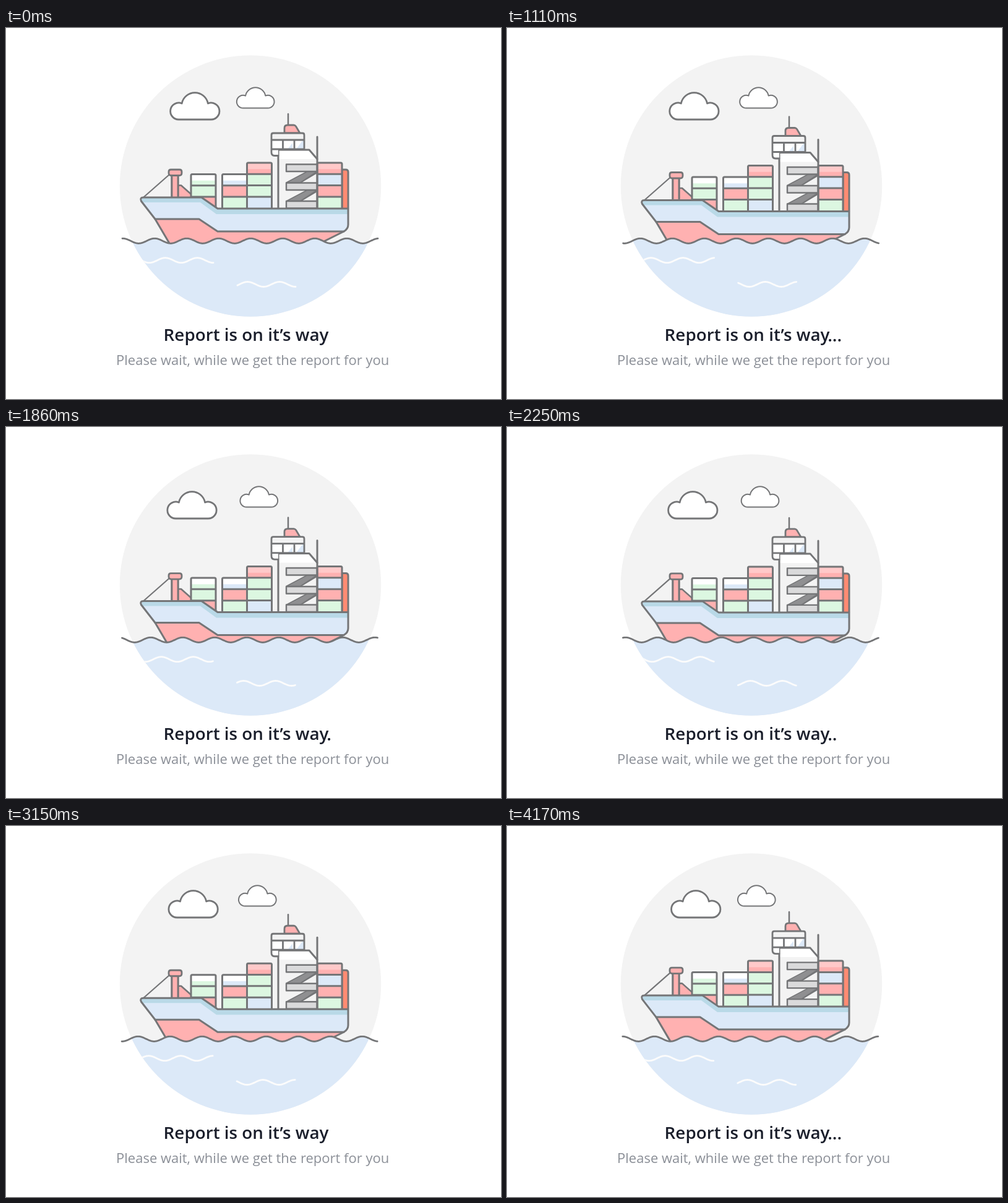
Write an HTML page with a canvas that moves like this. It is 800 by 600 pixels and loops after 4.2 s.

```html
<!DOCTYPE html>
<html lang="en">
<head>
<meta charset="utf-8">
<title>Report loading</title>
<style>
  html, body { margin: 0; width: 100%; height: 100%; overflow: hidden; background: #fff; }
  canvas { display: block; }
</style>
</head>
<body>
<canvas id="stage" width="800" height="600"></canvas>
<script>
const ctx = document.getElementById('stage').getContext('2d');
const LOOP = 4200, DOTS = 1400, SWELL = 2100, WAVE = 51.75;
const INK = '#747577', PINK = '#ffb1b1', PALE_PINK = '#ffc9c9', BLUE = '#dce9f8',
      BAND = '#b9d9e7', GREEN = '#dcf7e1', GREY = '#f3f3f3', STEP = '#dadadb';
const FONT = '"Open Sans", "Noto Sans", sans-serif';

function shape(d, fill, width = 3) {
  const path = new Path2D(d);
  if (fill) { ctx.fillStyle = fill; ctx.fill(path); }
  if (width) { ctx.strokeStyle = INK; ctx.lineWidth = width; ctx.stroke(path); }
}

function box(x, y, w, h, fill) {
  ctx.fillStyle = fill;
  ctx.fillRect(x, y, w, h);
}

// Containers stacked downwards; the top one has a lighter upper half.
function stack(x, y, light, fills) {
  const w = 40, h = 18.3;
  fills.forEach((fill, i) => {
    box(x, y + i * h, w, h, fill);
    if (!i) box(x, y, w, h * 0.56, light);
  });
  const bottom = y + fills.length * h;
  let d = `M${x} ${bottom}V${y + 2}q0 -2 2 -2h${w - 4}q2 0 2 2V${bottom}`;
  for (let i = 1; i < fills.length; i++) d += `M${x} ${y + i * h}h${w}`;
  shape(d);
}

function cloud(cx, bottom, scale, width) {
  ctx.save();
  ctx.translate(cx, bottom);
  ctx.scale(scale, scale);
  shape('M-25.5 0A13.5 13.5 0 1 1 -21.1 -26A21.5 21.5 0 0 1 21.1 -26A13.5 13.5 0 1 1 25.5 0Z',
    '#fff', width / scale);
  ctx.restore();
}

function crane() {
  shape('M264 237L222 274', null, 2.2);
  shape('M279 254h5L305 274H279Z', PINK, 0);
  shape('M279 254.5h4L305 274', null, 2.6);
  shape('M268 238V274M278 238V274', null);
  box(268, 238, 10, 36, PINK);
  shape('M268 274V238M278 274V238', null, 2.8);
  shape('M266.5 229h14q3.5 0 3.5 3.5v2q0 4 -4 4h-13q-4 0 -4 -4v-2q0 -3.5 3.5 -3.5Z', PINK, 2.8);
}

function tower() {
  shape('M440 197H490L503 212V291H440Z', GREY, 0);
  shape('M440 197H490L503 212H440Z', '#fff', 0);
  for (const y of [232, 262]) {
    shape(`M453 ${y + 18}L487 ${y}H503V${y + 2}L476 ${y + 18}Z`, '#8f8f91', 1.5);
    shape(`M503 ${y}L476 ${y + 18}`, null, 2);
  }
  for (const y of [220.5, 250.5, 280]) shape(`M453 ${y}H503V${y + 11.5}H453Z`, STEP, 2.4);
  shape('M440 291V197H490L503 212');
}

function bridge() {
  shape('M456 139V157', null, 2.5);
  shape('M450 170V162Q450 157 455 157H465Q467 157 468.5 159L475 170Z', PINK, 2.8);
  shape('M429 196V173Q429 170 432 170H479Q482 170 482 173V196Z', '#fff', 0);
  box(430, 171, 51, 10, GREY);
  shape('M469 196L480 181H482V196Z', BLUE, 0);
  shape('M455 196L463 186V196Z', BLUE, 0);
  shape('M440 206H434Q429 206 429 201V196H440Z', '#fff', 0);
  shape('M440 206.5H434Q429 206.5 429 201V173Q429 170 432 170H479Q482 170 482 173V196' +
    'M429 181H482M429 196H482M447.5 181V196M466 181V196', null, 2.8);
}

function hull() {
  shape('M241 309H312L342 329H546L500 352V360H271Z', PINK, 0);
  const top = 'M222 274H316L342 292H553';
  shape(top + 'V318Q553 325 546 329H342L312 309H241L218.5 280Q216 274 222 274Z', BLUE, 0);
  shape(top + 'V301H340L314 282H221L219 278Z', BAND, 0);
  shape('M241 309H312L342 329H546');
  shape('M271 360L241 309L218.5 280Q216 274 222 274H316L342 292H553V318Q553 325 546 329L500 352');
}

function ship(dy) {
  ctx.save();
  ctx.translate(0, dy);
  crane();
  stack(299, 236.5, '#fff', [GREEN, GREEN, PINK]);
  stack(349.5, 236.5, '#fff', [BLUE, PINK, GREEN]);
  stack(389.5, 218, PALE_PINK, [PINK, GREEN, GREEN, BLUE]);
  tower();
  bridge();
  shape('M543 291V229H549Q553 229 553 233V291', '#ff8b72');
  stack(503, 218, PALE_PINK, [PINK, BLUE, PINK, GREEN]);
  shape('M503 176V291');
  hull();
  ctx.restore();
}

function wavePath(x0, x1, y, crest, t) {
  for (let x = x0; x <= x1; x += 0.5) {
    const phase = (x - crest) / WAVE - t / SWELL;
    ctx.lineTo(x, y - 4 * Math.cos(2 * Math.PI * phase));
  }
}

function ripple(x0, x1, y, crest, t, colour) {
  ctx.beginPath();
  wavePath(x0, x1, y, crest, t);
  ctx.strokeStyle = colour;
  ctx.lineWidth = 2.8;
  ctx.stroke();
}

function disc() {
  ctx.beginPath();
  ctx.arc(395, 255.5, 211.2, 0, 2 * Math.PI);
}

function sea(t) {
  const drift = -1.2 * t / LOOP;
  ctx.save();
  disc();
  ctx.clip();
  ctx.translate(drift, 0);
  ctx.beginPath();
  wavePath(180, 612, 344.3, 188.5, t);
  ctx.lineTo(612, 480);
  ctx.lineTo(180, 480);
  ctx.fillStyle = BLUE;
  ctx.fill();
  ripple(205, 335, 375.7, 335 - WAVE / 2, t, '#fcfcfc');
  ripple(374, 468, 414.5, 468 - WAVE / 2, t, '#fcfcfc');
  ctx.restore();
  ctx.save();
  ctx.translate(drift, 0);
  ripple(188, 601, 344.3, 188.5, t, INK);
  ctx.restore();
}

function text(str, x, y, font, colour) {
  ctx.font = `${font} ${FONT}`;
  ctx.fillStyle = colour;
  ctx.fillText(str, x, y);
}

function captions(t) {
  const title = '600 27.8px', dark = '#1a1e2b', step = t % DOTS;
  const count = [360, 690, 1035].filter(at => step >= at).length;
  text('Report is on it’s way', 254.6, 506, title, dark);
  text('.'.repeat(count), 518.2, 507.4, title, dark);
  text('Please wait, while we get the report for you', 178, 545.3, '400 22px', '#8b8f97');
}

function draw(t) {
  const sway = 1 - Math.abs(1 - t / (LOOP / 2));
  box(0, 0, 800, 600, '#fff');
  disc();
  ctx.fillStyle = GREY;
  ctx.fill();
  cloud(305.3 - 5.4 * sway, 148, 1, 2.8);
  cloud(403.2 + 6.3 * sway, 129.5, 0.765, 2);
  ship(8.5 * sway);
  sea(t);
  captions(t);
}

ctx.lineCap = 'round';
ctx.lineJoin = 'round';
const start = performance.now();
function frame() {
  draw((performance.now() - start) % LOOP);
  requestAnimationFrame(frame);
}
frame();
</script>
</body>
</html>
```
